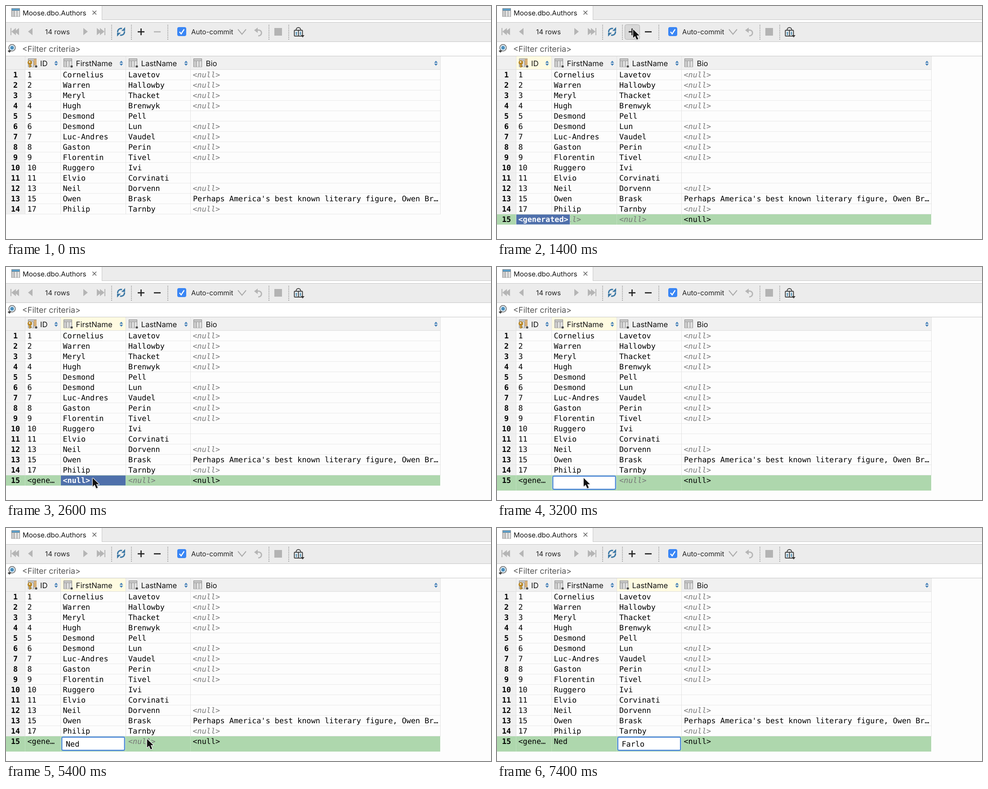
Animation, 1079 px wide and 519 px high, one loop 8 s. Source, as an HTML page with a canvas:

```html
<!DOCTYPE html>
<html lang="en">
<head>
<meta charset="utf-8">
<title>Table editor</title>
<style>
html, body { margin: 0; width: 100%; height: 100%; overflow: hidden; background: #fff; }
canvas { display: block; }
</style>
</head>
<body>
<canvas id="stage" width="1079" height="519"></canvas>
<script>
const ctx = document.getElementById('stage').getContext('2d');
ctx.textRendering = 'geometricPrecision';

const MONO = '16.8px "DejaVu Sans Mono", monospace';
const ui = size => `${size}px Inter, sans-serif`;
const GREY = '#767676', BLUE = '#4f70ab', GREEN = '#aed7ad', LINE = '#c6c6c6';
const LOOP = 8000, STEP = 200, ROW = 23, TOP = 142, NEW = TOP + 14 * ROW;
const COLS = [42, 121, 266, 410, 966];
const NULL = '<null>';

const people = [
  [1, 'Cornelius', 'Lavetov', NULL],
  [2, 'Warren', 'Hallowby', NULL],
  [3, 'Meryl', 'Thacket', NULL],
  [4, 'Hugh', 'Brenwyk', NULL],
  [5, 'Desmond', 'Pell', ''],
  [6, 'Desmond', 'Lun', NULL],
  [7, 'Luc-Andres', 'Vaudel', NULL],
  [8, 'Gaston', 'Perin', NULL],
  [9, 'Florentin', 'Tivel', NULL],
  [10, 'Ruggero', 'Ivi', ''],
  [11, 'Elvio', 'Corvinati', ''],
  [13, 'Neil', 'Dorvenn', NULL],
  [15, 'Owen', 'Brask', "Perhaps America's best known literary figure, Owen Br…"],
  [17, 'Philip', 'Tarnby', NULL]
];
const FIRST = 'Ned', LAST = 'Farlo';

// Pointer legs: [time, x, y], joined by straight moves
const legs = [
  [[400, 405, 3], [1000, 302, 51], [1600, 302, 51], [1800, 291, 98], [2000, 269, 176],
   [2400, 198, 442], [2600, 192, 469], [3600, 192, 469]],
  [[4800, 255, 456], [5000, 278, 461], [5400, 313, 469], [6200, 313, 469]]
];

function rect(x, y, w, h, color) {
  ctx.fillStyle = color;
  ctx.fillRect(x, y, w, h);
}
function round(x, y, w, h, r, fill, stroke, width = 1) {
  ctx.beginPath();
  ctx.roundRect(x, y, w, h, r);
  ctx.fillStyle = fill;
  ctx.fill();
  if (stroke) {
    ctx.strokeStyle = stroke;
    ctx.lineWidth = width;
    ctx.stroke();
  }
}
function trace(pts) {
  ctx.beginPath();
  for (let i = 0; i < pts.length; i += 2) ctx.lineTo(pts[i], pts[i + 1]);
}
function poly(color, ...pts) {
  trace(pts);
  ctx.fillStyle = color;
  ctx.fill();
}
function line(color, width, ...pts) {
  trace(pts);
  ctx.strokeStyle = color;
  ctx.lineWidth = width;
  ctx.stroke();
}
function arc(x, y, r, from, to, color, width) {
  ctx.beginPath();
  ctx.arc(x, y, r, from, to);
  ctx.strokeStyle = color;
  ctx.lineWidth = width;
  ctx.stroke();
}
function dot(x, y, r, color) {
  ctx.beginPath();
  ctx.arc(x, y, r, 0, 7);
  ctx.fillStyle = color;
  ctx.fill();
}
function text(s, x, y, font = MONO, color = '#000', align = 'left') {
  ctx.font = font;
  ctx.fillStyle = color;
  ctx.textAlign = align;
  ctx.fillText(s, x, y);
}
const nullText = (x, y) => text(NULL, x, y, 'italic ' + MONO, GREY);

function tableIcon(x, y, head, marked) {
  rect(x, y, 19, 19, '#858585');
  rect(x + 1, y + 1, 17, 4, head);
  for (let i = 0; i < 3; i++)
    for (let j = 0; j < 4; j++)
      rect(x + 1 + i * 6, y + 6 + j * 3.2, 5, 2.6, i ? '#f5f5f5' : '#dedede');
  if (marked) {
    dot(x + 18, y + 17.5, 3.3, '#f0f0f0');
    dot(x + 18, y + 17.5, 2.6, '#4a4a4a');
  }
}

function tabs() {
  rect(0, 0, 1079, 31, '#ececec');
  rect(213, 30, 866, 1, LINE);
  rect(0, 0, 213, 31, '#fff');
  rect(213, 0, 1, 31, LINE);
  tableIcon(12, 5, '#5d9fc9');
  text('Moose.dbo.Authors', 37, 20.5, ui(15.2), '#111');
  line('#666', 1.6, 192.5, 10.5, 201, 19);
  line('#666', 1.6, 201, 10.5, 192.5, 19);
}

// Two half-turn arrows around one centre
function refreshIcon(x, y) {
  const blue = '#3c78a5';
  for (const turn of [0, Math.PI]) {
    ctx.save();
    ctx.translate(x, y);
    ctx.rotate(turn);
    arc(0, 0, 7.6, 3, 5, blue, 3);
    poly(blue, 0.5, -2, 9, -2, 9, -10.5);
    ctx.restore();
  }
}

function toolbar(s) {
  const off = '#b5b5b5';
  rect(0, 36, 1079, 44, '#ececec');
  rect(0, 36, 1079, 1, LINE);
  rect(0, 79, 1079, 1, LINE);
  const left = x => poly(off, x, 57, x + 10, 49, x + 10, 65);
  const right = x => poly(off, x, 57, x - 10, 49, x - 10, 65);
  rect(10, 49, 2, 16, off);
  left(12); left(19); left(49);
  right(182); right(212); right(219);
  rect(219, 49, 2, 16, off);
  text('14 rows', 87, 63, ui(15.2), '#222');
  for (const x of [235, 279, 360, 585, 629])
    for (let y = 42; y < 75; y += 3.9) rect(x - 0.8, y, 1.6, 1.8, '#8a8a8a');

  refreshIcon(256, 57.5);

  if (s.button) round(284.5, 41.5, 33, 33, 4, s.button, '#b0b0b0');
  rect(293, 56.2, 15, 2.6, '#222');
  rect(299.2, 50, 2.6, 15, '#222');
  rect(329, 56.2, 15, 2.6, s.added ? '#222' : off);

  round(381, 47, 20, 20, 4, '#3a86f5');
  line('#fff', 2.4, 386, 57.5, 389.7, 62, 396.3, 51.8);
  text('Auto-commit', 412, 63, ui(15.2), '#222');
  line('#a9a9a9', 2, 516, 52, 525, 63, 534, 52);
  arc(562, 60, 6.4, -1.6, 1.7, off, 2.8);
  line(off, 2.8, 562, 53.7, 558, 53.7);
  poly(off, 552, 54, 560, 48, 560, 60);
  rect(597, 49, 17, 17, '#b3b3b3');

  arc(650.5, 53, 5, Math.PI, 0, '#444', 2);
  round(641.5, 54, 18, 13, 1, '#e9eef1', '#444', 2);
  rect(649.6, 54, 2, 13, '#444');
  poly('#4687ab', 644, 60, 646, 57, 648, 60);
  rect(645, 60, 2, 5, '#4687ab');
  poly('#4687ab', 653, 62, 655, 65, 657, 62);
  rect(654, 57, 2, 5, '#4687ab');
  poly('#333', 656, 65, 664, 65, 660, 70);
}

function filterBar() {
  line('#666', 3, 10, 97, 5, 102);
  dot(13.5, 93, 8.2, '#777');
  dot(13.5, 93, 6.4, '#e2eff7');
  dot(13.5, 93, 4, '#4b8fbd');
  poly('#444', 4, 99, 12, 99, 8, 104);
  text('<Filter criteria>', 36, 102, ui(17.9), '#555');
  rect(0, 111, 1079, 1, LINE);
}

function headers(active) {
  rect(0, 112, 966, 30, '#f0f0f0');
  if (active >= 0) rect(COLS[active] + 1, 112, COLS[active + 1] - COLS[active] - 1, 29, '#fffbe1');
  rect(0, 141, 966, 1, '#dcdcdc');
  ['ID', 'FirstName', 'LastName', 'Bio'].forEach((name, i) => {
    const x = COLS[i], end = COLS[i + 1] - 9.5;
    tableIcon(i ? x + 7 : 49, 117, '#c9c9c9', i < 3);
    text(name, i ? x + 34.5 : 76, 134, ui(16.8), '#111');
    poly('#3c7bb5', end - 4, 126.5, end, 122, end + 4, 126.5);
    poly('#3c7bb5', end - 4, 128.5, end, 133, end + 4, 128.5);
  });
  rect(62, 118, 6, 14, '#d8b078');
  dot(53, 126, 5, '#b98725');
  dot(52.5, 124.7, 1.6, '#fff');
  rect(51.5, 129, 3, 8, '#b98725');
  rect(54, 133, 3, 2, '#b98725');
}

function rows() {
  rect(0, TOP, 42, 14 * ROW, '#f0f0f0');
  people.forEach((p, i) => {
    const y = TOP + i * ROW, base = y + 17;
    rect(0, y + 22, 966, 1, '#e8e8e8');
    text(i + 1, 21, base, 'bold ' + MONO, '#000', 'center');
    text(p[0], 47.5, base);
    text(p[1], 126.5, base);
    text(p[2], 272, base);
    if (p[3] === NULL) nullText(415.5, base);
    else text(p[3], 416, base);
  });
  for (const x of COLS) rect(x, 112, 1, 30 + 14 * ROW, '#e2e2e2');
}

function selected(x, w, s, textX) {
  rect(x, NEW + 0.5, w, 22, BLUE);
  text(s, textX, NEW + 17, 'bold ' + MONO, '#fff');
}

function editor(x, value, caret) {
  round(x + 0.5, NEW + 2, 139, 29, 3, '#fff', '#8db8f0', 3.5);
  round(x + 0.5, NEW + 2, 139, 29, 2, '#fff', '#4380d4', 1.8);
  text(value, x + 9, NEW + 23);
  if (caret) rect(x + 9 + value.length * 10.114, NEW + 7, 1.4, 20, '#000');
}

function newRow(s) {
  const base = NEW + 17;
  rect(0, NEW, 966, s.edit ? 34 : ROW, GREEN);
  for (const x of COLS.slice(0, 4)) rect(x, NEW, 1, s.edit ? 34 : ROW, '#bfe0be');
  text(15, 21, base, 'bold ' + MONO, '#000', 'center');
  if (s.col) text('<gene…', 47.5, base);
  if (s.col === 2) text(FIRST, 126.5, base);
  else nullText(126.5, base);
  nullText(272, base);
  text(NULL, 415.5, base);
  if (s.col === 0) {
    rect(42, NEW, 121, ROW, '#d5e4dc');
    selected(43, 119, '<generated>', 47.5);
  } else if (s.edit) {
    editor(s.col === 1 ? 124 : 268.5, s.value, s.caret);
  } else {
    selected(COLS[s.col] + 1, 144, NULL, s.col === 1 ? 126.5 : 272);
  }
}

function arrow(x, y) {
  ctx.save();
  ctx.translate(x, y);
  ctx.shadowColor = 'rgba(0,0,0,.35)';
  ctx.shadowBlur = 3;
  ctx.shadowOffsetY = 1.5;
  const shape = [0.8, 1, 0.8, 20, 5.3, 16, 8.8, 24, 12.2, 22.6, 8.8, 14.8, 14.8, 14.8];
  poly('#fff', ...shape);
  ctx.shadowColor = 'transparent';
  ctx.lineJoin = 'round';
  line('#fff', 2.4, ...shape, 0.8, 1);
  poly('#111', ...shape);
  ctx.restore();
}

function cross(x, y) {
  for (const [w, color] of [[4, '#fff'], [2, '#333']]) {
    line(color, w, x - 9, y, x + 9, y);
    line(color, w, x, y - 9, x, y + 9);
  }
}

function pointer(t) {
  const leg = legs.find(l => t >= l[0][0] && t <= l[l.length - 1][0]);
  if (!leg) return;
  const i = Math.max(1, leg.findIndex(k => k[0] >= t));
  const [t0, x0, y0] = leg[i - 1], [t1, x1, y1] = leg[i];
  const k = (t - t0) / (t1 - t0);
  (t >= 4800 && t < 5200 ? cross : arrow)(x0 + (x1 - x0) * k, y0 + (y1 - y0) * k);
}

function stateAt(t) {
  const s = { added: t >= 1400, button: '', col: -1, edit: false, value: '', caret: false };
  if (t >= 1000 && t < 1800) s.button = t === 1200 ? '#c8c8c8' : '#d8d8d8';
  if (s.added) s.col = t < 2600 ? 0 : t < 5600 ? 1 : 2;
  s.edit = t >= 2800 && t < 5600 || t >= 5800;
  if (s.col === 1) {
    s.value = FIRST.slice(0, Math.max(0, (t - 3600) / STEP));
    s.caret = t < 3200 || t >= 3800 && t < 4800;
  } else if (s.col === 2) {
    const keys = (t - 6200) / STEP;
    s.value = LAST.slice(0, Math.max(0, keys > 2 ? keys + 1 : keys));
    s.caret = t < 6000 || t >= 6400 && t < 7400;
  }
  return s;
}

function draw(now) {
  const t = Math.floor(now % LOOP / STEP) * STEP;
  const s = stateAt(t);
  rect(0, 0, 1079, 112, '#fff');
  rect(0, 112, 1079, 407, '#fdfdfd');
  tabs();
  toolbar(s);
  filterBar();
  headers(s.col);
  rows();
  if (s.added) newRow(s);
  pointer(t);
}

const start = performance.now();
function tick() {
  draw(performance.now() - start);
  requestAnimationFrame(tick);
}
tick();
</script>
</body>
</html>
```
